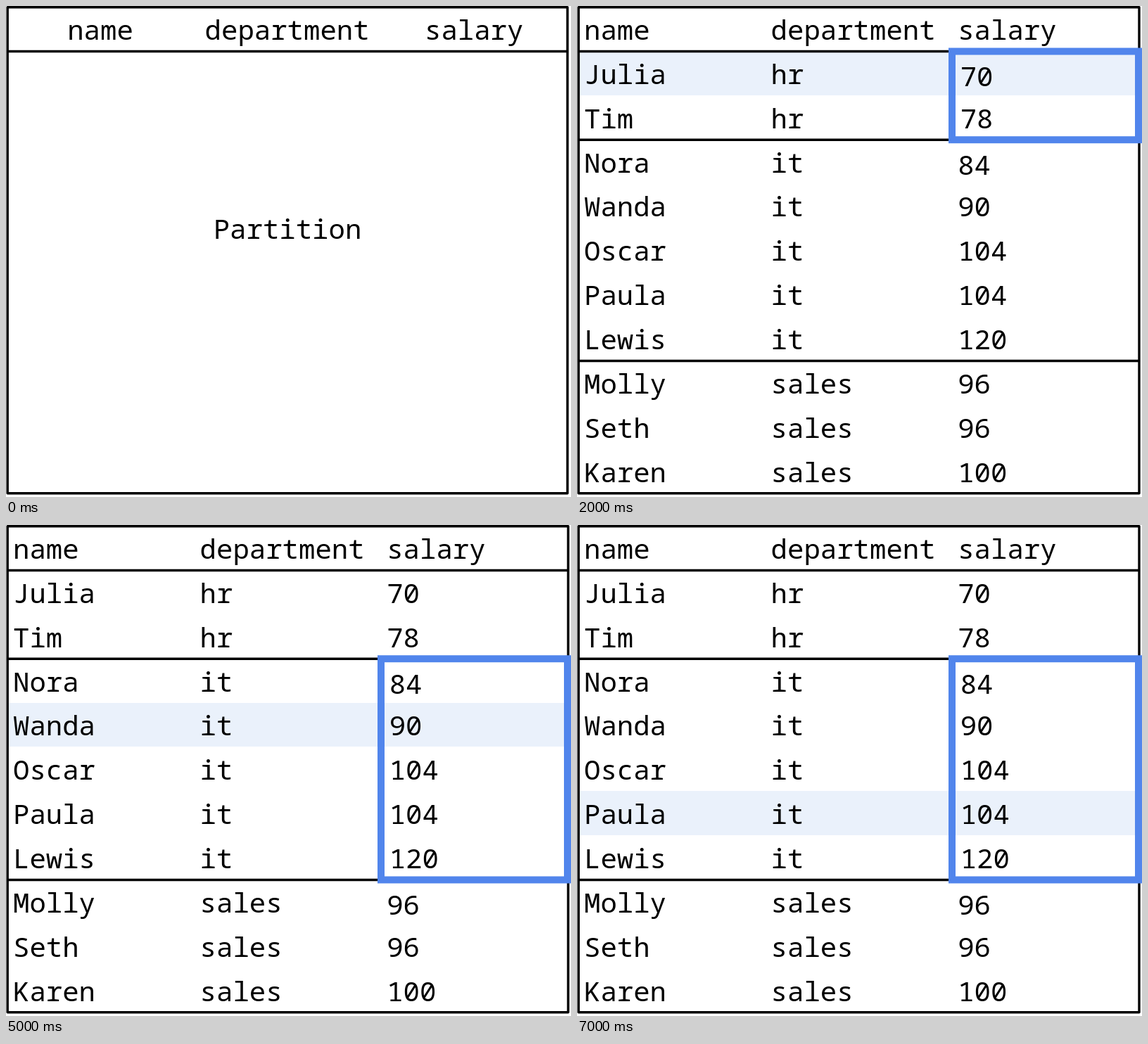
Write an HTML page with a canvas that moves like this. It is 803 px wide and 698 px high and loops after 8 s.

```html
<!DOCTYPE html>
<html lang="en">
<head>
<meta charset="utf-8">
<title>Window partitions</title>
<style>
  html, body { margin: 0; width: 100%; height: 100%; overflow: hidden; background: #fff; }
  canvas { display: block; }
</style>
</head>
<body>
<canvas id="stage" width="803" height="698"></canvas>
<script>
const ctx = document.getElementById('stage').getContext('2d');
const STEP = 1000, STEPS = 8;
const ROW = 62.85, COLUMN = 265.6, LEFT = 10, BASELINE = 48;
const HEADER = ['name', 'department', 'salary'];
const ROWS = [
  ['Julia', 'hr', 70], ['Tim', 'hr', 78],
  ['Nora', 'it', 84], ['Wanda', 'it', 90], ['Oscar', 'it', 104],
  ['Paula', 'it', 104], ['Lewis', 'it', 120],
  ['Molly', 'sales', 96], ['Seth', 'sales', 96], ['Karen', 'sales', 100]
];
const PARTITIONS = [{ first: 0, end: 2 }, { first: 2, end: 7 }];
const lineY = row => 64.5 + row * ROW;

function text(value, x, y, align = 'left') {
  ctx.textAlign = align;
  ctx.fillText(value, x, y);
}

function rule(y) {
  ctx.beginPath();
  ctx.moveTo(2, y);
  ctx.lineTo(798, y);
  ctx.stroke();
}

function drawGrid(right) {
  ctx.strokeStyle = '#000';
  ctx.lineWidth = 3.4;
  ctx.lineJoin = 'round';
  ctx.strokeRect(2.2, 1.7, right - 2.2, 691);
  rule(lineY(0));
}

function drawIntro() {
  drawGrid(798);
  HEADER.forEach((label, i) => text(label, 134 + i * COLUMN, BASELINE, 'center'));
  text('Partition', 400, 331, 'center');
}

function drawTable(current) {
  const active = PARTITIONS.find(p => current >= p.first && current < p.end);
  if (active) {
    ctx.fillStyle = '#eaf1fb';
    const top = Math.round(lineY(current) - 0.5);
    ctx.fillRect(4, top, 789, Math.round(lineY(current + 1) - 0.5) - top);
    ctx.fillStyle = '#000';
  }
  drawGrid(active ? 799 : 798);
  rule(lineY(2));
  rule(lineY(7));

  if (active) {
    const top = lineY(active.first);
    ctx.strokeStyle = '#5185ec';
    ctx.lineWidth = 10;
    ctx.lineJoin = 'miter';
    ctx.strokeRect(533, top, 265, lineY(active.end) - top);
  }

  HEADER.forEach((label, i) => text(label, LEFT + i * COLUMN, BASELINE));
  ROWS.forEach(([name, department, salary], i) => {
    const y = BASELINE + (i + 1) * ROW;
    text(name, LEFT, y);
    text(department, LEFT + COLUMN, y);
    // The thick frame pushes the salaries next to it aside.
    const inside = active && i >= active.first && i < active.end;
    const below = active && (i === active.first || i === active.end);
    text(salary, LEFT + 2 * COLUMN + (inside ? 3.5 : 0), y + (below ? 3.5 : 0));
  });
}

function draw(now) {
  const step = Math.floor(now / STEP) % STEPS;
  ctx.fillStyle = '#fff';
  ctx.fillRect(0, 0, 803, 698);
  ctx.fillStyle = '#000';
  ctx.font = '39px "Noto Sans Mono", "DejaVu Sans Mono", monospace';
  if (step === 0) drawIntro();
  else drawTable(step - 2);
  requestAnimationFrame(draw);
}
requestAnimationFrame(draw);
</script>
</body>
</html>
```
